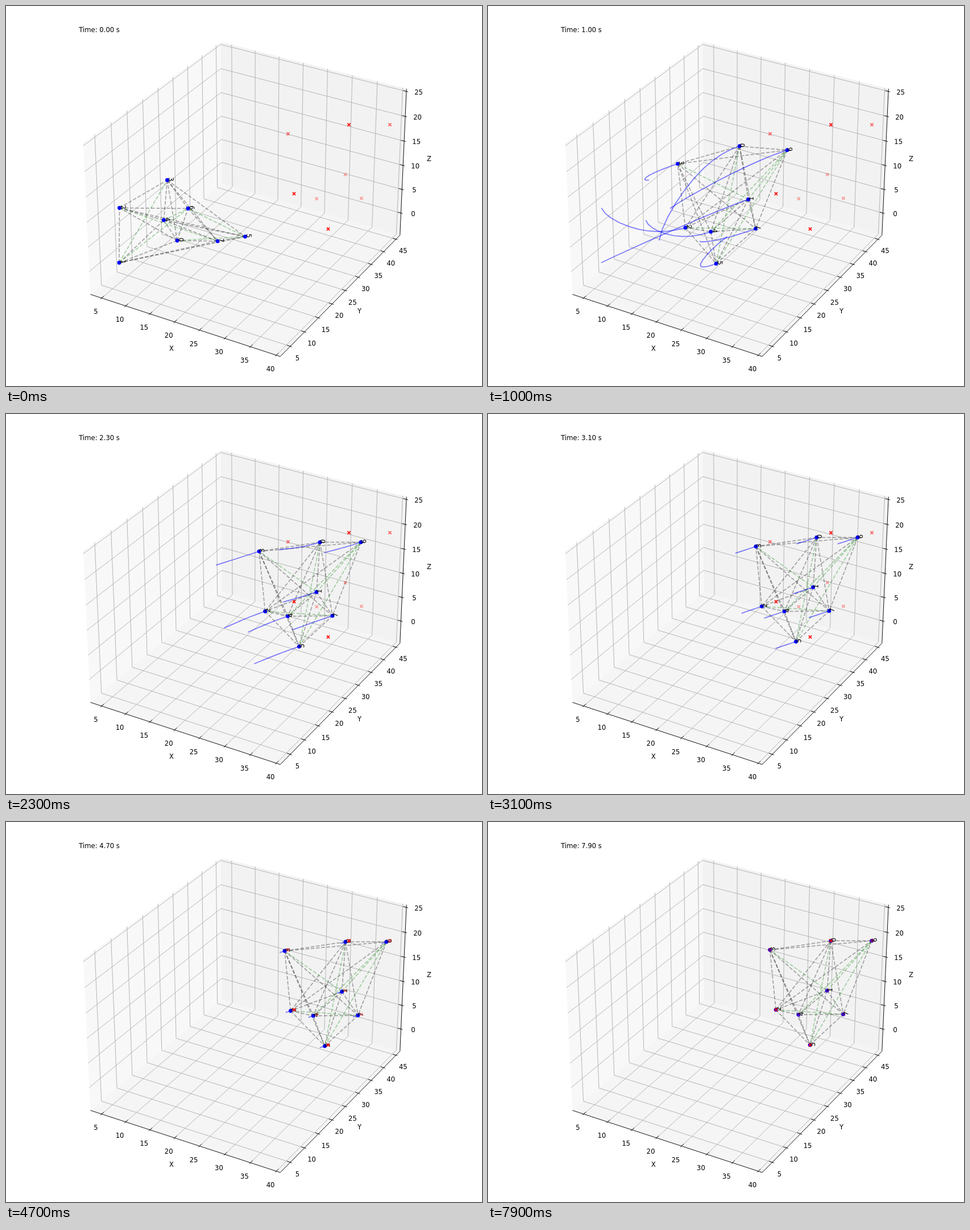
Recreate the animation shown at these times as an HTML page with a canvas. Size 837 by 669 pixels, loop 8000 ms.

```html
<!DOCTYPE html>
<html lang="en">
<head>
<meta charset="utf-8">
<title>Formation in 3D</title>
<style>
  html, body { margin: 0; width: 100%; height: 100%; overflow: hidden; background: #fff; }
  canvas { display: block; }
</style>
</head>
<body>
<canvas id="stage" width="837" height="669"></canvas>
<script>
const ctx = document.getElementById('stage').getContext('2d');
const FONT = '11.62px "DejaVu Sans", sans-serif';
const CENTER = 427.2;

// Plot limits per axis, shown with an equal scale
const lo = [2.64, 1.54, -4.74], hi = [40.75, 46.65, 25.53];
const span = lo.map((v, i) => hi[i] - v);
const UNIT = 1.9057 / Math.hypot(...span);

// Perspective camera: elevation 30 degrees, azimuth -60 degrees
function project(point) {
  const [x, y, z] = point.map((v, i) => (v - (lo[i] + hi[i]) / 2) * UNIT);
  const right = 0.866 * x + 0.5 * y;
  const up = -0.25 * x + 0.433 * y + 0.866 * z;
  const depth = 10 - (0.433 * x - 0.75 * y + 0.5 * z);
  return [CENTER + 3484 * right / depth, 326.1 - 3480.5 * up / depth];
}

function path(points) {
  ctx.beginPath();
  points.forEach(p => ctx.lineTo(...p));
}

function stroke(points, color, width) {
  path(points);
  ctx.strokeStyle = color;
  ctx.lineWidth = width;
  ctx.stroke();
}

function text(str, x, y, align = 'center') {
  ctx.font = FONT;
  ctx.textAlign = align;
  ctx.fillStyle = '#000';
  ctx.fillText(str, x, y);
}

const range = (from, to, step = 1) =>
  Array.from({ length: Math.floor((to - from) / step) + 1 }, (_, i) => from + i * step);
const ticks = [range(5, 40, 5), range(5, 45, 5), range(0, 25, 5)];

// A copy of the base point with some coordinates replaced
function place(base, ...pairs) {
  const p = base.slice();
  pairs.forEach(([axis, v]) => p[axis] = v);
  return p;
}

function drawWalls() {
  const back = [lo[0], hi[1], lo[2]], front = [hi[0], lo[1], hi[2]];
  ['#f8f8f8', '#f2f2f2', '#f5f5f5'].forEach((color, i) => {
    const a = (i + 1) % 3, b = (i + 2) % 3;
    path([
      back,
      place(back, [a, front[a]]),
      place(back, [a, front[a]], [b, front[b]]),
      place(back, [b, front[b]])
    ].map(project));
    ctx.fillStyle = color;
    ctx.fill();
  });
  ticks.forEach((values, i) => {
    const a = (i + 1) % 3, b = (i + 2) % 3;
    values.forEach(v => stroke([
      place(back, [i, v], [a, front[a]]),
      place(back, [i, v]),
      place(back, [i, v], [b, front[b]])
    ].map(project), '#b0b0b0', 0.93));
  });
}

// One axis edge, with ticks along direction dir and labels shifted by (dx, dy)
function drawAxis(axis, base, dir, sign, dx, dy) {
  const unit = sign * span[dir] / 12;
  stroke([lo, hi].map(end => project(place(base, [axis, end[axis]]))), '#000', 0.93);
  ticks[axis].forEach(v => {
    const p = place(base, [axis, v]);
    stroke([0.1, -0.2].map(k => project(place(p, [dir, p[dir] + k * unit]))), '#000', 0.93);
    const [x, y] = project(p);
    text(v, x + dx, y + dy + 4.2);
  });
}

function drawAxes() {
  drawAxis(0, lo, 1, -1, -10.3, 24);
  drawAxis(1, [hi[0], 0, lo[2]], 0, 1, 12.6, 20.5);
  drawAxis(2, hi, 0, 1, 21.5, 1);
  text('X', 291, 607);
  text('Y', 621.5, 541);
  text('Z', 744, 273);
}

// Sway bends an agent's way sideways; alpha fades its goal mark with distance
const agents = [
  { start: [301, 413], goal: [603, 209], sway: -30, alpha: 0.95 },
  { start: [199, 452], goal: [596.7, 296.7], sway: 10, alpha: 0.36 },
  { start: [199.5, 355.5], goal: [506.5, 330.5], sway: -28, alpha: 0.95 },
  { start: [283.5, 306.5], goal: [496, 225], sway: 7, alpha: 0.58 },
  { start: [277.5, 377], goal: [546.3, 339.2], sway: 12, alpha: 0.36 },
  { start: [420.5, 406], goal: [566.5, 392.5], sway: 29, alpha: 0.95 },
  { start: [320, 356.5], goal: [675, 209], sway: -9, alpha: 0.58 },
  { start: [372, 414], goal: [625, 338.5], sway: 20, alpha: 0.36 }
];
const meanGap = [0, 1].map(c =>
  agents.reduce((sum, a) => sum + a.start[c] - a.goal[c], 0) / agents.length);

// The group drifts to its goal while each agent settles into the formation
function position({ start, goal, sway }, t) {
  const drift = 1.41 * Math.exp(-0.89 * t) - 0.41 * Math.exp(-2.9 * t);
  const settle = Math.exp(-1.4 * t * t);
  return [sway, 0].map((bend, c) => {
    const error = start[c] - goal[c] - meanGap[c];
    return goal[c] + meanGap[c] * drift + (error * (1 - 1.5 * t) + bend * t) * settle;
  });
}

const greenPairs = ['05', '13', '16', '27', '46', '56'];

function drawLinks(spots) {
  ctx.setLineDash([6.44, 2.79]);
  spots.forEach((p, i) => spots.slice(i + 1).forEach((q, k) => {
    const green = greenPairs.includes(`${i}${i + 1 + k}`);
    stroke([p, q], green ? 'rgba(0,128,0,.33)' : 'rgba(0,0,0,.33)', 1.74);
  }));
  ctx.setLineDash([]);
}

function drawDot([x, y]) {
  ctx.beginPath();
  ctx.arc(x, y, 3.4, 0, 2 * Math.PI);
  ctx.fillStyle = '#00f';
  ctx.fill();
}

// Labels run along the vertical axis, flipping at the centre line
function drawLabel([x, y], name) {
  const down = x < CENTER;
  ctx.save();
  ctx.translate(x + (down ? 7 : 4.7), y - 1.5);
  ctx.rotate((down ? 1 : -1) * Math.PI / 2 + (x - CENTER) * 0.000172);
  text(name, 0, 4.25);
  ctx.restore();
}

function drawCross({ goal: [x, y], alpha }) {
  const r = 2.6;
  ctx.beginPath();
  [-r, r].forEach(d => {
    ctx.moveTo(x - r, y - d);
    ctx.lineTo(x + r, y + d);
  });
  ctx.strokeStyle = `rgba(255,0,0,${alpha})`;
  ctx.lineWidth = 1.74;
  ctx.stroke();
}

function draw(step) {
  const t = step / 10;
  ctx.fillStyle = '#fff';
  ctx.fillRect(0, 0, 837, 669);
  ctx.lineJoin = 'round';
  drawWalls();
  drawAxes();
  text(`Time: ${t.toFixed(2)} s`, 128.3, 45.6, 'left');

  const spots = agents.map(a => position(a, t));
  drawLinks(spots);
  // Trails show the last second of flight
  agents.forEach(a => {
    const trail = range(Math.max(0, step - 10), step).map(s => position(a, s / 10));
    stroke(trail, 'rgba(0,0,255,.5)', 1.74);
  });
  spots.forEach(drawDot);
  spots.forEach(drawLabel);
  agents.forEach(drawCross);
}

const begin = performance.now();
function tick() {
  draw(Math.floor((performance.now() - begin) % 8000 / 100));
  requestAnimationFrame(tick);
}
tick();
</script>
</body>
</html>
```
